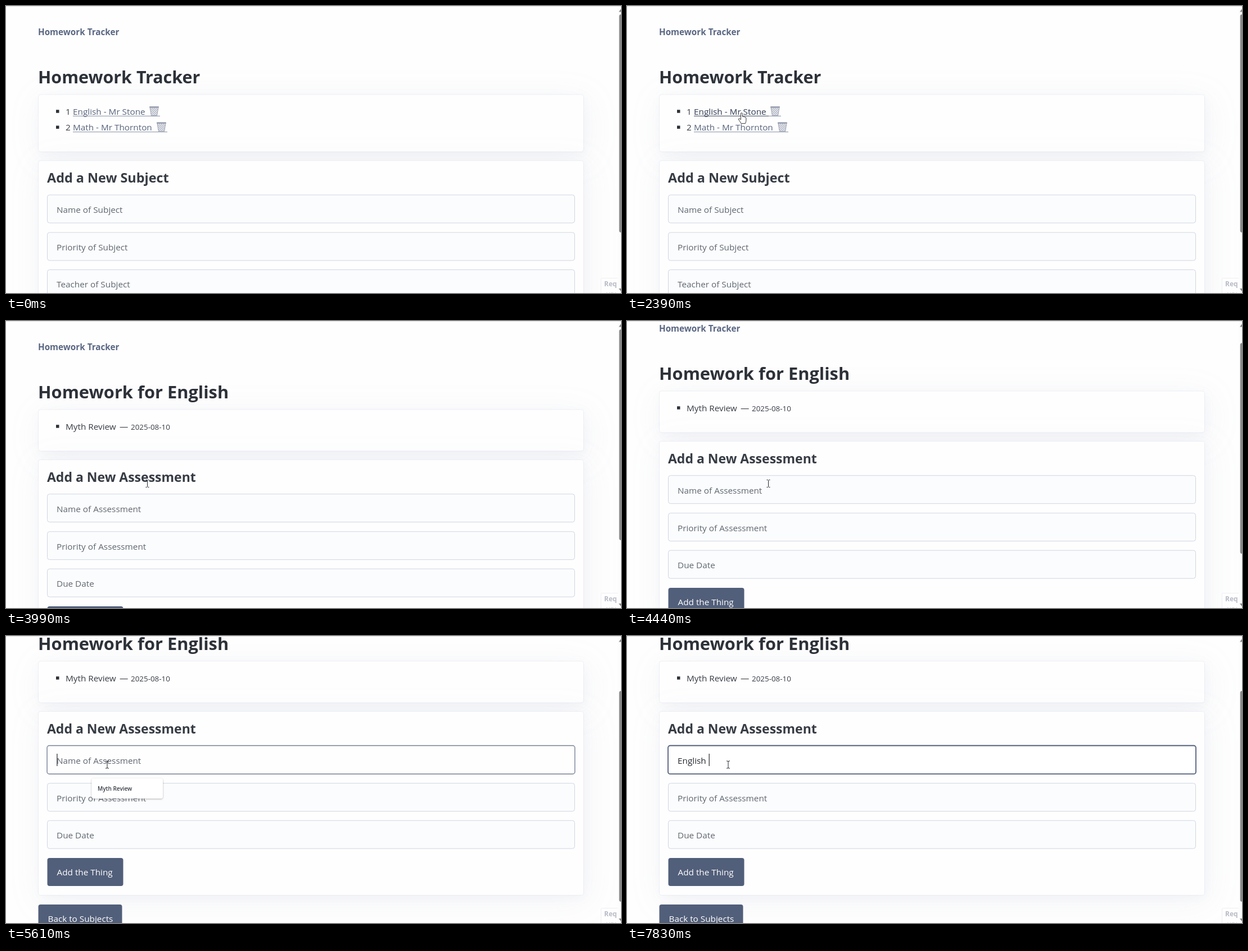
An HTML page that plays this animation: 1094x512 px, repeating every 8000 ms.

```html
<!DOCTYPE html>
<html lang="en">
<head>
<meta charset="utf-8">
<title>Homework Tracker</title>
<style>
  html, body { margin: 0; width: 100%; height: 100%; overflow: hidden; background: #fefefe; }
  svg { display: block; width: 100vw; height: 100vh; }
  text { font: 15.3px "Open Sans", "Noto Sans", sans-serif; fill: #373c44; white-space: pre; }
  .bold { font-weight: 700; }
  .nav { fill: #5a6783; }
  .h1 { fill: #2d3138; }
  .link { fill: #58637b; }
  .dark { fill: #323a4b; }
  .hint { fill: #5f666f; }
  .light { fill: #fff; }
  .typed { fill: #22262d; }
  .card { fill: #fefefe; stroke: #8191b5; stroke-opacity: .12; }
  .field { fill: #fbfcfd; stroke: #cfd5e2; }
  .button { fill: #525f7a; }
</style>
</head>
<body>
<svg id="stage" viewBox="0 0 1094 512" preserveAspectRatio="none"></svg>
<script>
const LOOP = 8000;

const text = (x, y, str, cls = '', size = 15.3) =>
  `<text x="${x}" y="${y}" class="${cls}" style="font-size:${size}px">${str}</text>`;
const rect = (x, y, w, h, attrs = '') =>
  `<rect x="${x}" y="${y}" width="${w}" height="${h}" ${attrs}/>`;
const card = (y, h) =>
  `<g filter="url(#shadow)">${rect(57.5, y, 970, h, 'rx="4" class="card"')}</g>`;
const field = (y, hint) =>
  rect(73.5, y, 938, 50, 'rx="4" class="field"') + text(90, y + 31.8, hint, 'hint');
const button = (x, y, w, label) =>
  rect(x, y, w, 50, 'rx="4" class="button"') + text(x + 17, y + 31.3, label, 'light');
const bullet = y => rect(89, y, 5.5, 5.5, 'fill="#2d3138"');
const line = (x1, x2, y, color) =>
  `<path d="M${x1} ${y}H${x2}" stroke="${color}" stroke-width="1.2"/>`;
const bin = (x, y) => `<g transform="translate(${x} ${y})">
  <path d="M1 2H16L13.6 16.5H3.4Z" fill="#a9aebc"/>
  <path d="M1 2H16L13.6 16.5H3.4Z" fill="url(#mesh)"/>
  <path d="M1 2H16L13.6 16.5H3.4Z" fill="none" stroke="#a0a6b5"/>
  ${rect(0, 0, 17, 2.6, 'rx="1" fill="#9ba1b1"')}</g>`;
const listItem = (y, number, label, end) =>
  bullet(y - 8.3) + text(106, y, number) + text(119, y, label, 'link') +
  line(119, end, y + 2.9, '#9aa3b5') + bin(end - 19, y - 14.5);
const header = (title, size) =>
  text(57, 51.7, 'Homework Tracker', 'bold nav', 15.25) +
  text(57, 137.5, title, 'bold h1', size);

const subjectLabel = 'English - Mr Stone';
const homework = 'Myth Review';

const subjectsPage =
  header('Homework Tracker', 30.45) + card(158, 102) +
  listItem(193.5, '1', subjectLabel, 274) +
  listItem(221.8, '2', 'Math - Mr Thornton', 287) +
  `<g id="hover">${text(119, 193.5, subjectLabel, 'dark')}${line(119, 252, 196.4, '#323a4b')}</g>` +
  card(276, 330) + text(73, 315.4, 'Add a New Subject', 'bold', 23.4) +
  field(337, 'Name of Subject') + field(404, 'Priority of Subject') +
  field(470.5, 'Teacher of Subject');

const homeworkPage =
  header('Homework for English', 30.8) + card(158, 74) +
  bullet(185.2) + text(106, 193.5, homework) + text(202, 193.5, '—') +
  text(222, 193.5, '2025-08-10', '', 13.4) +
  card(247.5, 328) + text(73, 287, 'Add a New Assessment', 'bold', 23) +
  field(308.7, '') +
  `<g id="focus">${rect(73, 308.5, 939, 50.7, 'rx="4" fill="#fff" stroke="#525f7a" id="ring"')}</g>` +
  text(90, 340.5, 'Name of Assessment', 'hint').replace('<text', '<text id="entry"') +
  field(375.7, 'Priority of Assessment') + field(442.2, 'Due Date') +
  button(73.5, 509, 135, 'Add the Thing') +
  button(57.5, 592, 149, 'Back to Subjects') +
  rect(0, 323, 1.2, 22, 'id="caret" fill="#22262d"') +
  `<g id="popup"><g filter="url(#popShadow)">${rect(152.5, 367, 126.5, 36, 'rx="4" fill="#fff"')}</g>
  ${text(163, 389, homework, '', 10).replace('style="', 'style="font-weight:600;')}</g>`;

const chrome =
  rect(1058.5, 485.5, 50, 40, 'rx="2" fill="#fefefe" stroke="#efeff3"') +
  text(1064, 500, 'Req', 'bold', 12).replace('style="', 'style="fill:#b8bbc6;') +
  text(1067, 519, 'URL', 'bold', 11).replace('style="', 'style="fill:#d3d5dc;') +
  rect(1088, 0, 6, 512, 'fill="#fcfcfc"') +
  rect(1090.7, 15, 7, 389, 'rx="3.5" fill="#8a8a8a" id="thumb"') +
  '<path d="M1090 10.5l4.5-6 4.5 6zM1090 504h9l-4.5 6z" fill="#8a8a8a"/>' +
  rect(0, 0, 1094, 1, 'fill="#e1e1e3"') +
  `<g id="status">${rect(-2, 495.5, 117.5, 20, 'rx="3" fill="#d3e3fd" stroke="#bccbe6"')}
  ${text(0, 508, 'testpanel:4100/subject/36', '', 9.1)}</g>`;

const pointers = `<g id="pointer">
  <path id="beam" d="M-3-6.5H-1L0-5.5 1-6.5H3M0-5.5V5.5M-3 6.5H-1L0 5.5 1 6.5H3" fill="none" stroke="#25282e"/>
  <path id="arrow" d="M.5.5V13.5L3.4 10.8 5.4 15.5 7.4 14.6 5.5 10.1H9.5Z" fill="#fff" stroke="#222" stroke-width=".9"/>
  <path id="hand" d="M-2 .8Q-2-.5-.6-.5T.8.8V6Q2.5 5.2 3.2 6.6 4.8 6 5.4 7.4 7.5 7 7.5 9V13Q7.5 15.5 6 18.5H-1.5Q-2.6 15.5-5.4 12.2-6.6 10.4-5.4 9.8-4 9.2-2 11.6Z" fill="#fff" stroke="#222" stroke-width=".9"/>
</g>`;

const stage = document.getElementById('stage');
stage.innerHTML = `<defs>
  <filter id="shadow" filterUnits="userSpaceOnUse" x="-60" y="-60" width="1300" height="900" color-interpolation-filters="sRGB">
    <feDropShadow dx="2" dy="4" stdDeviation="8" flood-color="#8191b5" flood-opacity=".055"/>
    <feDropShadow dx="5" dy="10" stdDeviation="28" flood-color="#8191b5" flood-opacity=".09"/>
  </filter>
  <filter id="popShadow" x="-20%" y="-40%" width="140%" height="190%">
    <feDropShadow dx="0" dy="1" stdDeviation="1.5" flood-color="#000" flood-opacity=".3"/>
  </filter>
  <pattern id="mesh" width="3.6" height="3.6" patternUnits="userSpaceOnUse">
    <path d="M0 0L3.6 3.6M3.6 0L0 3.6" stroke="#f4f5f8" stroke-width=".9"/>
  </pattern></defs>
  <g id="subjects">${subjectsPage}</g><g id="homework">${homeworkPage}</g>${chrome}${pointers}`;

const el = {};
for (const node of stage.querySelectorAll('[id]')) el[node.id] = node;
const show = (node, on) => node.setAttribute('visibility', on ? 'visible' : 'hidden');
const fade = (node, amount) => node.setAttribute('opacity', amount);
const clamp = v => Math.max(0, Math.min(1, v));

// Number of screen updates reached in a run of evenly timed steps.
const stepAt = (t, start, end, steps) => t < start ? 0 :
  Math.min(steps, 1 + Math.floor((t - start + 5) / (end - start) * (steps - 1)));

const legs = [
  { from: [1004, 500], to: [659.5, 361], start: 740, end: 1240, steps: 8 },
  { from: [659.5, 361], to: [579, 339], start: 1510, end: 1570, steps: 1 },
  { from: [579, 339], to: [361, 262], start: 1570, end: 1700, steps: 3 },
  { from: [361, 262], to: [182, 181], start: 1960, end: 2460, steps: 8 },
  { from: [182, 181], to: [251.5, 290], start: 3850, end: 3990, steps: 3 },
  { from: [251.5, 290], to: [180, 229.5], start: 4930, end: 5475, steps: 9 }
];

function pointerAt(t) {
  const leg = legs.filter(l => t >= l.start).pop() || legs[0];
  const p = stepAt(t, leg.start, leg.end, leg.steps) / leg.steps;
  return leg.from.map((v, i) => v + (leg.to[i] - v) * p);
}

function pointerKind(t, y) {
  if (t < 810 || (t >= 3080 && t < 3300)) return '';
  if (t >= 3300) return t > 4930 && y > 247 && y < 263 ? 'arrow' : 'beam';
  if (t < 1960) return y > 336 && !(y > 387 && y < 404) && !(y > 454 && y < 470) ? 'beam' : 'arrow';
  return y < 199 ? 'hand' : 'arrow';
}

const typed = 'English ';
const keyTimes = [6410, 6550, 6750, 7020, 7240, 7330, 7420, 7830];
const caretStops = [90.3, 99, 108, 117, 121.3, 125.3, 132.3, 141.3, 145.6];

function render(t) {
  const onHomework = t >= 3370;
  const scrollStep = stepAt(t, 4390, 5130, 12);
  const scroll = Math.round(113 * (1 - (1 - Math.min(1, scrollStep / 6.3)) ** 2));
  el.subjects.style.display = onHomework ? 'none' : '';
  el.homework.style.display = onHomework ? '' : 'none';
  el.homework.setAttribute('transform', `translate(0 ${-scroll})`);
  el.thumb.setAttribute('y', 15 + scroll * .735);
  el.thumb.setAttribute('height', onHomework ? 376 : 389);

  const [x, y] = pointerAt(t);
  const kind = pointerKind(t, y);
  el.pointer.setAttribute('transform', `translate(${x} ${y})`);
  for (const name of ['beam', 'arrow', 'hand']) show(el[name], name === kind);

  fade(el.hover, clamp((t - 2320) / 140));
  fade(el.status, t < 2610 || t >= 3510 ? 0 : t < 2760 ? .5 : 1);

  const focus = stepAt(t, 5540, 5750, 4) / 4;
  fade(el.focus, focus && .5 + focus / 2);
  el.ring.setAttribute('stroke-width', 1 + focus * .8);
  fade(el.popup, t < 5540 || t >= 6480 ? 0 : t < 5610 || t >= 6410 ? .5 : 1);

  const count = keyTimes.filter(k => t >= k).length;
  el.entry.textContent = count ? typed.slice(0, count) : 'Name of Assessment';
  el.entry.setAttribute('class', count ? 'typed' : 'hint');
  el.caret.setAttribute('x', caretStops[count]);
  fade(el.caret, (t >= 5540 && t < 6010) || count ? 1 : 0);
}

const began = performance.now();
function tick() {
  render((performance.now() - began) % LOOP);
  requestAnimationFrame(tick);
}
tick();
</script>
</body>
</html>
```
